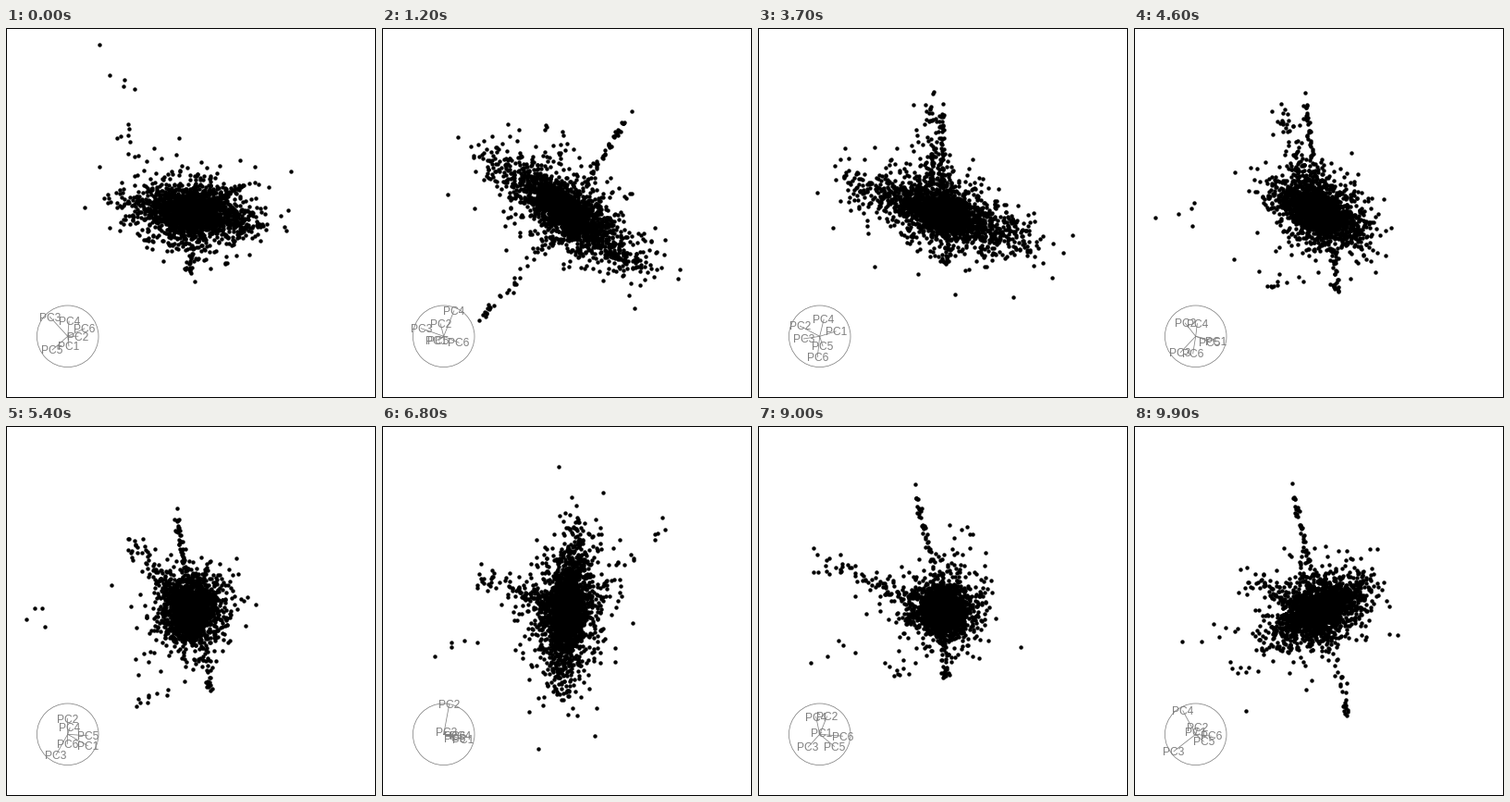
These frames come from a looping animation (400 by 400 pixels, 10000 ms). A matplotlib script:

```python
import numpy as np
import matplotlib.pyplot as plt
from matplotlib.animation import FuncAnimation
from matplotlib.patches import Circle, Rectangle

SIZE, DPI = 400, 100
PX = 72 / DPI
FRAMES, STEP = 100, 100
MID = np.array([200, 200])
HUB, RADIUS = np.array([66.7, 333.3]), 33.3
GREY = "#7f7f7f"
FLIP = np.array([1, -1])
rng = np.random.default_rng(11)

# Tour stops: step number, then x and y loadings of PC1..PC6
STOPS = [
    (0, [.04, .34, -.59, .04, -.50, .55], [-.32, 0, .64, .49, -.44, .25]),
    (12, [-.25, -.10, -.73, .34, -.17, .49], [-.14, .40, .25, .82, -.14, -.20]),
    (37, [.52, -.64, -.52, .13, .10, -.07], [.16, .34, -.08, .55, -.32, -.68]),
    (54, [.64, -.01, -.37, .07, .64, -.01], [-.38, .52, -.68, .22, -.05, -.32]),
    (68, [.64, .16, .10, .55, .36, .36], [-.17, .97, .07, -.05, -.14, -.05]),
    (82, [.16, .28, -.07, .13, .55, .76], [.02, .79, -.23, .34, -.44, -.08]),
    (99, [.01, .07, -.70, -.40, .25, .49], [.07, .22, -.56, .76, -.23, -.05]),
]


def orthonormal(m):
    u, _, vt = np.linalg.svd(m, full_matrices=False)
    return u @ vt


TIMES = np.array([s[0] for s in STOPS])
KEYS = np.array([orthonormal(np.array(s[1:]).T) for s in STOPS])
SLOPES = np.gradient(KEYS, TIMES, axis=0)


def basis(step):
    """Projection plane at a step: Hermite path through the stops."""
    i = min(np.searchsorted(TIMES, step, side="right") - 1, len(TIMES) - 2)
    h = TIMES[i + 1] - TIMES[i]
    t = (step - TIMES[i]) / h
    m = ((2 * t**3 - 3 * t**2 + 1) * KEYS[i]
         + (t**3 - 2 * t**2 + t) * h * SLOPES[i]
         + (3 * t**2 - 2 * t**3) * KEYS[i + 1]
         + (t**3 - t**2) * h * SLOPES[i + 1])
    return orthonormal(m)


def lift(tips):
    """Smallest 6D vector that projects close to tips[i] at stop i."""
    a = np.vstack([KEYS[i].T for i in tips])
    b = np.concatenate(list(tips.values()))
    return np.linalg.solve(a.T @ a + .04 * np.eye(6), a.T @ b)


def core(n, sd, axis):
    """Round heavy-tailed cloud, stretched along one axis."""
    scale = np.clip(np.exp(.45 * rng.normal(size=(n, 1))), .3, 2.6)
    along = np.clip(rng.laplace(scale=.75, size=(n, 1)), -2.8, 2.8)
    return sd * scale * rng.normal(size=(n, 6)) + along * axis


def arm(n, noise, start, power, tips):
    t = start + (1 - start) * rng.random((n, 1)) ** power
    return t * lift(tips) + noise * rng.normal(size=(n, 6))


DATA = np.vstack([
    core(2200, 12.5, lift({0: (22, 8), 1: (26, -24), 2: (38, -3),
                           4: (-4, -32), 6: (32, 9)})),
    arm(42, 1.5, .25, 1.2, {1: (73, 112), 2: (-3, 125), 3: (-17, 114),
                            6: (-32, 142)}),
    arm(40, 3, .2, 1.4, {0: (13, -107), 1: (-86, -96), 3: (12, -110),
                         6: (24, -140)}),
    arm(110, 7, .1, 1.6, {2: (-16, 122), 4: (-95, 40), 5: (-150, 62)}),
    arm(5, 6, .6, 1, {2: (-125, 24), 4: (-160, -68), 5: (-120, -52)}),
    arm(16, 8, .4, 1, {4: (115, 102), 5: (62, 108)}),
    arm(9, 6, .55, 1, {0: (-79, 94), 3: (-55, -110)}),
])

fig = plt.figure(figsize=(SIZE / DPI, SIZE / DPI), dpi=DPI, facecolor="white")
ax = fig.add_axes([0, 0, 1, 1])
ax.set(xlim=(0, SIZE), ylim=(SIZE, 0))
ax.axis("off")
ax.add_patch(Rectangle((.5, .5), SIZE - 1, SIZE - 1, fill=False,
                       ec="black", lw=PX, snap=False))
ax.add_patch(Circle(HUB, RADIUS, fill=False, ec=GREY, lw=.75 * PX))
dots, = ax.plot([], [], "o", color="black", ms=4.4 * PX, mew=0, zorder=2)
spokes = [ax.plot([], [], color=GREY, lw=.75 * PX, zorder=3)[0]
          for _ in range(6)]
labels = [ax.text(0, 0, f"PC{i + 1}", color=GREY, fontsize=12 * PX,
                  family="Liberation Sans", ha="center", va="baseline",
                  zorder=4) for i in range(6)]


def update(step):
    plane = basis(step) * FLIP
    dots.set_data(*(MID + DATA @ plane).T)
    for end, spoke, label in zip(HUB + RADIUS * plane, spokes, labels):
        spoke.set_data(*zip(HUB, end))
        label.set_position(end + [0, 4.3])
    return [dots, *spokes, *labels]


anim = FuncAnimation(fig, update, frames=FRAMES, interval=STEP, repeat=True,
                     repeat_delay=0, blit=False)
plt.show()
```
